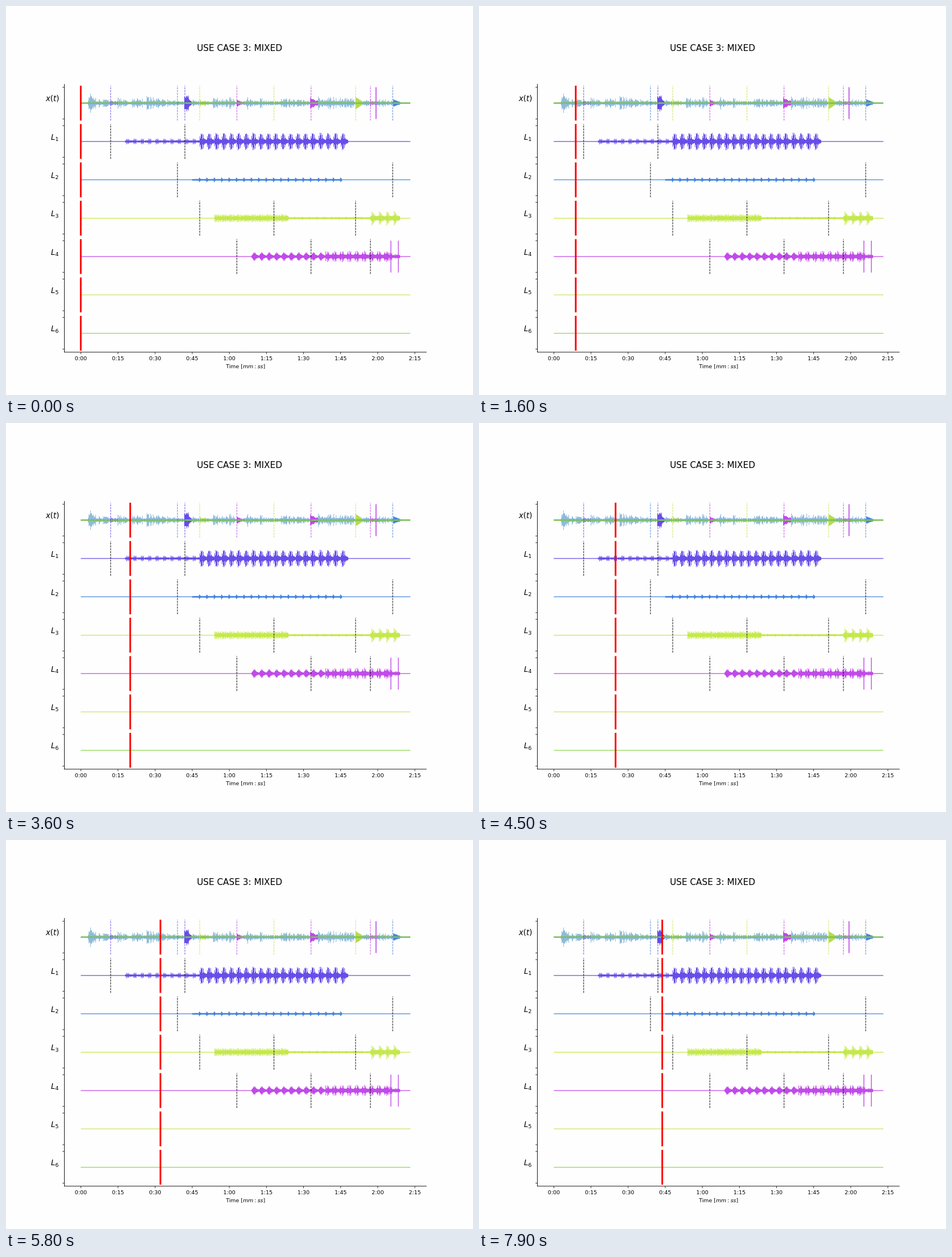
These frames come from a looping animation (820 px wide and 683 px high, 8000 ms). An HTML page with a canvas:

```html
<!DOCTYPE html>
<html lang="en">
<head>
<meta charset="utf-8">
<title>Use case 3: mixed</title>
<style>
  html, body { margin: 0; width: 100%; height: 100%; overflow: hidden; background: #fefefe; }
  canvas { display: block; }
</style>
</head>
<body>
<canvas id="stage" width="820" height="683"></canvas>
<script>
const W = 820, H = 683;
const LOOP = 8000, STEP = 100;
const X0 = 131.3, SEC = 4.344, END = 710;
const ROW0 = 170.5, ROW = 67.35, HALF = 30.6;
const BEAT = 3 * SEC;
const C = {
  mix: '#8fbbd9', violet: '#674ee8', blue: '#4585dd', lime: '#c5e84c',
  pink: '#c04be8', pale: '#d3e985', green: '#8edb52'
};

const stage = document.getElementById('stage').getContext('2d');
const plot = document.createElement('canvas');
plot.width = W;
plot.height = H;
const g = plot.getContext('2d');

const rowY = i => ROW0 + i * ROW;
const secX = s => X0 + s * SEC;

let seed = 7;
function rnd() {
  seed = (seed * 16807) % 2147483647;
  return seed / 2147483647;
}

function line(x1, y1, x2, y2, color, width = 1, dash = []) {
  g.strokeStyle = color;
  g.lineWidth = width;
  g.setLineDash(dash);
  g.beginPath();
  g.moveTo(x1, y1);
  g.lineTo(x2, y2);
  g.stroke();
}

function text(str, x, y, size, align = 'left', style = '') {
  g.font = `${style} ${size}px "DejaVu Sans", sans-serif`;
  g.textAlign = align;
  g.fillStyle = '#000';
  g.fillText(str, x, y);
  return g.measureText(str).width;
}

// One vertical stroke per column, sized by amp(x)
function wave(y, from, to, color, amp) {
  g.fillStyle = color;
  for (let x = from; x < to; x++) {
    const a = amp(x);
    const up = a * (0.85 + 0.15 * rnd()), down = a * (0.85 + 0.15 * rnd());
    g.fillRect(x, y - up, 1, up + down);
  }
}

// Repeats a list of column heights once per beat
function beats(y, start, count, color, heights) {
  for (let n = 0; n < count; n++) {
    const x = Math.round(start + n * BEAT);
    wave(y, x, x + heights.length, color, c => heights[c - x]);
  }
}

function burst(y, from, to, amp, color, fade = 0.5) {
  wave(y, from, to, color, x => {
    const k = 1 - fade * (x - from) / (to - from);
    return amp * k * (0.25 + 0.75 * rnd() ** 1.6);
  });
}

function mixture() {
  const y = rowY(0);
  wave(y, 143, 692, C.mix, () => 1.5 + 2.5 * rnd());
  [
    [144, 165, 14], [148, 149, 24], [170, 183, 9], [196, 214, 11], [198, 200, 18],
    [221, 240, 12], [247, 268, 16], [250, 251, 20], [268, 281, 10], [283, 297, 9],
    [325, 336, 7], [363, 376, 14], [378, 390, 10], [392, 401, 15], [421, 431, 16],
    [431, 444, 9], [446, 458, 10], [458, 470, 5], [483, 508, 12], [508, 531, 8],
    [548, 564, 15], [564, 588, 15], [588, 612, 14], [625, 638, 7], [653, 673, 9]
  ].forEach(([a, b, amp]) => burst(y, a, b, amp, C.mix, 0.35));

  burst(y, 183, 197, 5.5, C.violet);
  burst(y, 301, 313, 2.5, C.blue);
  wave(y, 313, 326, C.violet, x => x < 321 ? 10 + 6 * rnd() : 8 - (x - 320));
  burst(y, 340, 356, 8, '#b4dc4c');
  wave(y, 405, 420, C.pink, x => 7 - 0.4 * (x - 405) - 2 * rnd());
  wave(y, 534, 548, C.pink, x => 11 - 0.5 * (x - 534) - 3 * rnd());
  wave(y, 614, 626, '#b4dc4c', x => 13 - 0.8 * (x - 614) - 3 * rnd());
  burst(y, 640, 654, 7, C.pink);
  line(649.7, y - 28, 649.7, y + 28, C.pink, 1.7);
  wave(y, 680, 694, C.blue, x => 7 - 0.45 * (x - 680));
  line(X0, y, END, y, '#6fae72', 2.4);
  line(X0, y, END, y, '#84cc50', 1.4);
}

function layers() {
  [C.violet, C.blue, C.lime, C.pink, C.pale, C.green].forEach((color, i) =>
    line(X0, rowY(i + 1), END, rowY(i + 1), color, 1.3));

  let y = rowY(1);
  wave(y, 209, 340, C.violet, () => 1.4 + 0.9 * rnd());
  beats(y, 211, 10, C.violet, [5, 2, 5, 2, 4.5]);
  wave(y, 340, 601, C.violet, () => 2.5 + rnd());
  beats(y, 340, 20, C.violet, [10, 6, 15.5, 13, 15, 5, 13, 7, 5, 4, 4, 3, 2]);

  y = rowY(2);
  wave(y, 327, 589, C.blue, () => 1.5);
  beats(y, 338, 20, C.blue, [2, 4.5, 3, 2]);

  y = rowY(3);
  wave(y, 366, 496, C.lime, () => 2.6 + 1.5 * rnd());
  beats(y, 366, 10, C.lime, [7.5, 3, 7, 6, 3, 6.5, 3, 7, 3, 5, 6, 3, 4]);
  wave(y, 496, 640, C.lime, () => 1.5 + 0.4 * rnd());
  beats(y, 506, 10, C.lime, [2.4, 2.2]);
  wave(y, 640, 692, C.lime, () => 3 + rnd());
  beats(y, 640, 4, C.lime, [5, 4, 13, 6, 11, 9, 4, 7, 4, 5, 4, 3, 3]);

  y = rowY(4);
  wave(y, 431, 692, C.pink, () => 2);
  beats(y, 431, 10, C.pink, [2, 3, 5, 6, 8, 6, 7.5, 5, 4, 3.5, 3, 2.5, 2]);
  beats(y, 561, 9, C.pink, [9, 5, 4, 10, 6, 9, 4, 4, 3, 4, 3, 4, 6]);
  wave(y, 666, 692, C.pink, () => 2.5 + 5 * rnd() ** 2);
  for (const x of [675.8, 688.9]) line(x, y - 28, x, y + 28, C.pink, 1.4);
}

function marks() {
  [
    [C.violet, 12, 42], [C.blue, 39, 126], [C.lime, 48, 78, 111], [C.pink, 63, 93, 117]
  ].forEach(([color, ...times], i) => times.forEach(s => {
    const x = secX(s + 0.08);
    for (const [row, ink] of [[0, color], [i + 1, '#000']]) {
      line(x, rowY(row) + HALF, x, rowY(row) - HALF, ink, 0.95, [3.5, 1.5]);
    }
  }));
}

function axes() {
  line(102.5, 137, 102.5, 608, '#000', 0.9);
  line(102.1, 607.8, 738.5, 607.8, '#000', 0.9);
  for (let i = 0; i < 7; i++) {
    const y = rowY(i);
    line(99.2, y - 27.8, 102.5, y - 27.8, '#000', 0.8);
    line(99.2, y + 27.8, 102.5, y + 27.8, '#000', 0.8);
    if (i) {
      text('L', 79, y - 3.2, 13.3, 'left', 'italic');
      text(i, 86.4, y - 1, 9.3);
    }
  }
  let x = 70;
  x += text('x', x, 167.2, 13.3, 'left', 'italic');
  x += text('(', x, 167.2, 13.3);
  x += text('t', x, 167.2, 13.3, 'left', 'italic');
  text(')', x, 167.2, 13.3);

  for (let s = 0; s <= 135; s += 15) {
    const tx = secX(s) + 0.2;
    line(tx, 608, tx, 611.3, '#000', 0.8);
    text(`${Math.floor(s / 60)}:${String(s % 60).padStart(2, '0')}`, tx, 622, 9.5, 'center');
  }

  x = 386.3;
  x += text('Time [', x, 636.3, 9.4);
  x += text('mm', x, 636.3, 9.4, 'left', 'italic') + 2.2;
  x += text(':', x, 636.3, 9.4) + 2.2;
  x += text('ss', x, 636.3, 9.4, 'left', 'italic');
  text(']', x, 636.3, 9.4);

  text('USE CASE 3: MIXED', 410, 79.4, 15.25, 'center');
}

function frame(now) {
  const step = Math.floor((now % LOOP) / STEP);
  stage.drawImage(plot, 0, 0);
  stage.fillStyle = '#f00';
  for (let i = 0; i < 7; i++) {
    stage.fillRect(X0 - 1.45 + step * 2.411, rowY(i) - HALF, 2.9, 2 * HALF);
  }
  requestAnimationFrame(t => frame(Math.max(0, t - start)));
}

g.fillStyle = '#fefefe';
g.fillRect(0, 0, W, H);
mixture();
layers();
marks();
axes();
const start = performance.now();
frame(0);
</script>
</body>
</html>
```
